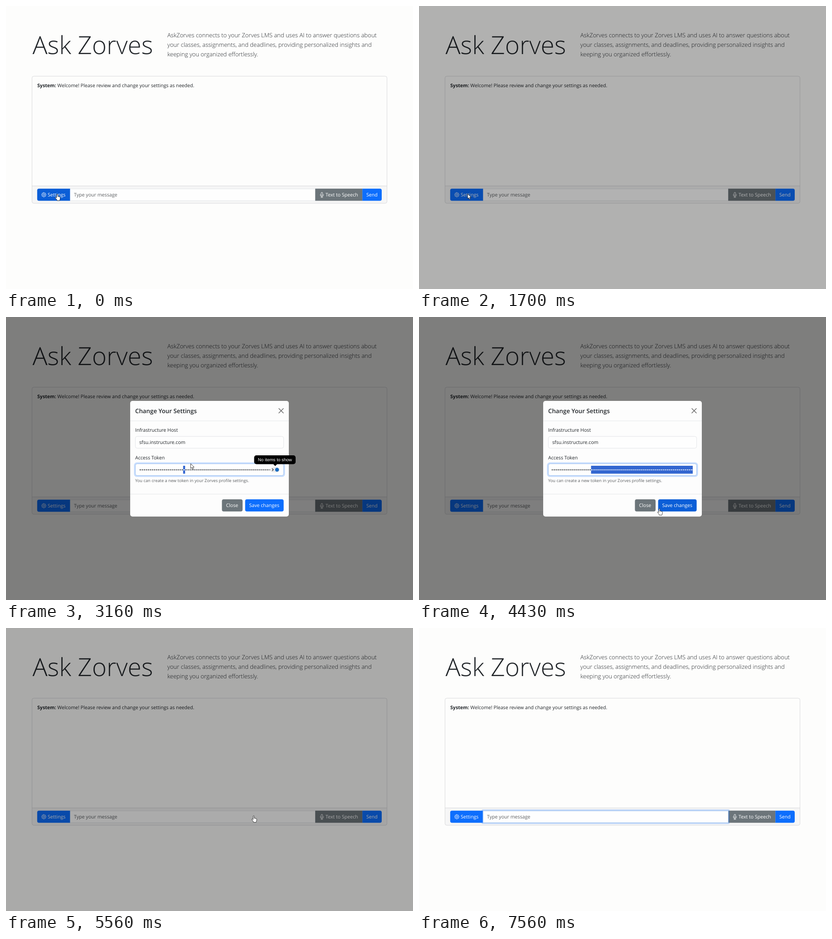
Write an HTML page that moves like this. It is 898 by 624 pixels and loops after 8 s.

```html
<!DOCTYPE html>
<html lang="en">
<head>
<meta charset="utf-8">
<title>Ask Zorves</title>
<style>
  html, body { margin: 0; width: 100%; height: 100%; overflow: hidden; background: #fdfdfc; }
  svg { display: block; width: 898px; height: 624px; }
  text { font: 400 10.65px "Open Sans", "Noto Sans", sans-serif; fill: #212529; text-rendering: geometricPrecision; white-space: pre; }
  .title { font-size: 55px; font-weight: 300; }
  .lead { font-size: 13.02px; font-weight: 300; }
  .heading { font-size: 13.3px; font-weight: 600; }
  .bold { font-weight: 700; }
  .help { font-size: 9.3px; fill: #5c5f62; }
  .hint { fill: #5c5f62; }
  .light { fill: #fff; }
  .tip { font: 9.8px "Liberation Sans", Arial, sans-serif; fill: #fff; }
  .blue { fill: #0d6efd; }
  .gray { fill: #6c757a; }
  .rule { stroke: #d0d1d4; stroke-width: .8; fill: none; }
  .field { fill: #fefefe; stroke: #dcdfe3; stroke-width: .8; }
  .icon { fill: none; stroke: #fff; stroke-width: .9; stroke-linecap: round; stroke-linejoin: round; }
  .glow { fill: none; stroke: #0d6efd; stroke-opacity: .22; stroke-width: 2.8; }
  .edge { fill: none; stroke: #93bdf7; stroke-width: .8; }
  .dots { fill: none; stroke-width: 2.5; stroke-linecap: round; stroke-dasharray: 0 4.4; }
  .pointer { fill: #fff; stroke: #111; stroke-width: .8; stroke-linejoin: round; }
</style>
</head>
<body>
<svg viewBox="0 0 898 624">
  <defs><clipPath id="tokenClip"><rect x="293" y="324" width="311" height="25"/></clipPath></defs>
  <rect width="898" height="624" fill="#fdfdfc"/>

  <text class="title" x="58.5" y="105.5">Ask Zorves</text>
  <text class="lead" x="356" y="69">AskZorves connects to your Zorves LMS and uses AI to answer questions about</text>
  <text class="lead" x="356" y="90">your classes, assignments, and deadlines, providing personalized insights and</text>
  <text class="lead" x="356" y="111">keeping you organized effortlessly.</text>

  <path d="M57.4 397H840.6V431a4 4 0 0 1-4 4H61.4a4 4 0 0 1-4-4Z" fill="#f6f6f6"/>
  <rect class="rule" x="57.4" y="154.8" width="783.2" height="280.2" rx="4"/>
  <path class="rule" d="M57.4 396.8H840.6"/>
  <text x="69" y="179"><tspan class="bold">System:</tspan> Welcome! Please review and change your settings as needed.</text>

  <rect class="field" x="140.9" y="403.1" width="541.8" height="26.1"/>
  <text class="hint" x="150" y="420.3">Type your message</text>
  <path id="settings" d="M141.3 402.7V429.5H72.8a4 4 0 0 1-4-4V406.7a4 4 0 0 1 4-4Z"/>
  <path id="gear" class="icon" transform="translate(83.5 416.2)"/>
  <circle class="icon" cx="83.5" cy="416.2" r="2"/>
  <text class="light" x="92" y="420.3">Settings</text>
  <rect class="gray" x="682.3" y="402.7" width="104.2" height="26.8"/>
  <rect class="icon" x="695.2" y="411" width="3.4" height="6.8" rx="1.7"/>
  <path class="icon" d="M693.4 415.6v.8a3.5 3.5 0 0 0 7 0v-.8M696.9 420v1.8M694.8 421.8h4.2"/>
  <text class="light" x="705" y="420.3">Text to Speech</text>
  <path class="blue" d="M786.3 402.7H825a4 4 0 0 1 4 4V425.5a4 4 0 0 1-4 4H786.3Z"/>
  <text class="light" x="795" y="420.3">Send</text>
  <g id="messageFocus">
    <rect class="glow" x="139.4" y="401.5" width="544.8" height="29.3" rx="1"/>
    <rect class="edge" x="140.9" y="403.1" width="541.8" height="26.1"/>
  </g>
  <path id="caret" d="M150.3 409.5V423.5" stroke="#212529" stroke-width=".9"/>

  <rect id="backdrop" width="898" height="624"/>

  <g id="modal">
    <rect x="274" y="185" width="350" height="255" rx="5" fill="#fdfdfd"/>
    <path class="rule" d="M274 229H624M274 390.5H624" style="stroke:#dfe2e5"/>
    <text class="heading" x="285" y="212">Change Your Settings</text>
    <path d="M602 201.8l10 10m0-10l-10 10" stroke="#5f5f5f" stroke-width="1.3" stroke-linecap="round"/>
    <text x="285" y="253">Infrastructure Host</text>
    <rect class="field" x="285.4" y="263.3" width="327.2" height="26" rx="4"/>
    <text x="294" y="280.4">sfsu.instructure.com</text>
    <text x="285" y="313.6">Access Token</text>
    <rect class="field" x="285.4" y="323.6" width="327.2" height="26" rx="4"/>
    <g id="tokenFocus">
      <rect class="glow" x="283.8" y="322" width="330.4" height="29.2" rx="5"/>
      <rect class="edge" x="285.4" y="323.6" width="327.2" height="26" rx="4"/>
    </g>
    <g clip-path="url(#tokenClip)">
      <g id="token">
        <path class="dots" d="M296.2 337H614" stroke="#212529"/>
        <rect id="selection" x="390.8" y="328" height="17.5" fill="#3366d0"/>
        <path id="picked" class="dots" stroke="#fff"/>
      </g>
    </g>
    <text class="help" x="285" y="364">You can create a new token in your Zorves profile settings.</text>
    <rect class="gray" x="476.4" y="402" width="45.6" height="26.8" rx="4"/>
    <text class="light" x="485.4" y="419.4">Close</text>
    <rect id="save" x="527.6" y="402" width="85" height="26.8" rx="4"/>
    <text class="light" x="536.4" y="419.4">Save changes</text>
    <g id="popup">
      <rect x="582.5" y="329" width="22" height="15.5" fill="#fefefe"/>
      <rect x="583.5" y="331" width="20" height="11.5" rx="5.7" fill="#e9eaec"/>
      <path d="M587.2 334l2.6 2.7-2.6 2.7" fill="none" stroke="#222" stroke-width="1.2"/>
      <circle cx="598" cy="336.7" r="4.3" fill="#1a6cc0"/>
      <rect x="547.5" y="305" width="91.5" height="19.5" rx="5"/>
      <path d="M589.5 324h9l-4.5 4.8Z"/>
      <text class="tip" x="555.8" y="318.3">No items to show</text>
    </g>
  </g>

  <g id="cursor">
    <path id="hand" class="pointer" d="M-1.2 1.2a1.2 1.2 0 0 1 2.4 0V5.2L5.4 6.2Q6.8 6.6 6.7 8.2L6.3 11.5 5.4 14.4H-.3L-1.3 11.8-4 8.7q-.6-1.1.3-1.6.9-.4 2.5 1.3Z"/>
    <path id="arrow" class="pointer" d="M0 0V10.8L2.5 8.5 4.2 12.4 6 11.6 4.3 7.8H7.7Z"/>
    <path id="beam" d="M-2-6h4M0-6V6M-2 6h4" fill="none" stroke="#222" stroke-width=".8"/>
  </g>
</svg>
<script>
const LOOP = 8000, PITCH = 4.4;
const $ = id => document.getElementById(id);
const show = (id, on) => { $(id).style.display = on ? '' : 'none'; };
const clamp = v => Math.min(1, Math.max(0, v));
const ramp = (t, start, length) => clamp((t - start) / length);
const easeOut = p => 1 - (1 - p) ** 2;
const smooth = p => p * p * (3 - 2 * p);
const pulse = (t, on, off, length) => ramp(t, on, length) - ramp(t, off, length);
const within = (t, a, b) => t >= a && t < b;

// time, x, y
const path = [
  [0, 113, 414.6], [500, 113, 414.6], [950, 113, 420], [1350, 107.5, 414.6], [1750, 107.3, 414.2],
  [2230, 380, 336], [2500, 388, 337], [2900, 392, 337], [3160, 407.5, 323.3],
  [3650, 612, 345], [3950, 590, 372], [4430, 530.5, 422.5], [4800, 546.5, 414], [8000, 546.5, 414]
];
const shapes = [[0, 'hand'], [1600, 'arrow'], [2180, 'beam'], [3080, 'arrow'],
  [4380, 'hand'], [5600, 'beam'], [5970, '']];

function pointerAt(t) {
  const i = path.findIndex(p => p[0] > t), a = path[i - 1], b = path[i];
  const p = smooth(ramp(t, a[0], b[0] - a[0]));
  return [1, 2].map(k => a[k] + (b[k] - a[k]) * p);
}

function mixBlue(hover) {
  return `rgb(${13 - 2 * hover},${110 - 16 * hover},${253 - 38 * hover})`;
}

function drawGear() {
  const points = [];
  for (let i = 0; i < 32; i++) {
    const angle = (i - .5) * Math.PI / 16, r = i % 4 < 2 ? 5 : 3.9;
    points.push(`${(r * Math.sin(angle)).toFixed(2)} ${(-r * Math.cos(angle)).toFixed(2)}`);
  }
  $('gear').setAttribute('d', `M${points.join('L')}Z`);
}

function render(t) {
  $('settings').style.fill = mixBlue(1 - ramp(t, 1560, 130));
  $('save').style.fill = mixBlue(pulse(t, 4300, 5600, 120));
  $('backdrop').style.opacity = .5 * pulse(t, 1610, 5510, 150);

  $('modal').style.opacity = pulse(t, 1770, 5200, 150);
  const drop = easeOut(ramp(t, 1770, 300)) - easeOut(ramp(t, 5200, 300));
  $('modal').setAttribute('transform', `translate(0 ${-35 * (1 - drop)})`);
  $('tokenFocus').style.opacity = pulse(t, 2560, 5150, 150);
  show('popup', within(t, 2650, 3500));

  const count = t < 3060 ? 0 : 1 + Math.round(50 * ramp(t, 3230, 400));
  const selected = count > 0 && t < 5150;
  show('selection', selected);
  show('picked', selected);
  $('selection').setAttribute('width', count * PITCH);
  $('picked').setAttribute('d', `M393 337h${Math.max(.1, (count - 1) * PITCH + .1)}`);
  $('token').setAttribute('transform', `translate(${-11.2 * ramp(t, 3580, 80)} 0)`);

  $('messageFocus').style.opacity = ramp(t, 5970, 150);
  show('caret', t >= 5970 && Math.floor((t - 5970) / 530) % 2 === 0);

  const current = shapes.filter(s => s[0] <= t).pop()[1];
  ['hand', 'arrow', 'beam'].forEach(id => show(id, id === current));
  $('cursor').setAttribute('transform', `translate(${pointerAt(t).join(' ')})`);
}

drawGear();
const start = performance.now();
function frame() {
  render((performance.now() - start) % LOOP);
  requestAnimationFrame(frame);
}
frame();
</script>
</body>
</html>
```
